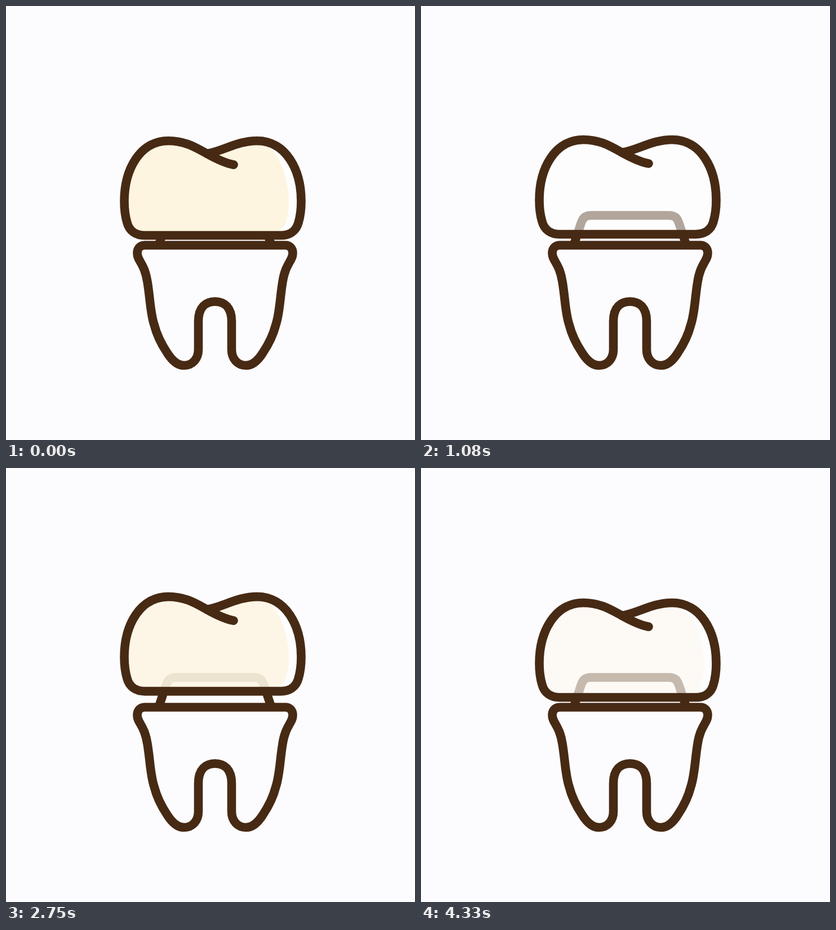
An HTML page that plays this animation: 726 by 771 pixels, repeating every 4410 ms.

```html
<!DOCTYPE html>
<html lang="en">
<head>
<meta charset="utf-8">
<title>Dental crown</title>
<style>
  html, body { margin: 0; width: 100%; height: 100%; overflow: hidden; background: #fcfcfe; }
  svg { display: block; width: 100%; height: 100%; }
  .line { fill: none; stroke: #472a14; stroke-width: 15.6; stroke-linecap: round; stroke-linejoin: round; }
</style>
</head>
<body>
<svg viewBox="0 0 726 771">
  <defs>
    <path id="shell" d="M356 262 C336 251 318 239.5 288 239.5 C238 239.5 210 290 210 347
      C210 365 212 375 215 385 C219 400 231 407.5 246 407.5 H488
      C503 407.5 515 400 519 385 C522 375 524 365 524 347
      C524 290 496 239.5 446 239.5 C410 239.5 385 258 358 262"/>
  </defs>

  <path class="line" style="stroke-linecap: butt" d="M272 422 L283 389 C287 376 291 372 302 372
    H440 C451 372 455 376 459 389 L470 422"/>
  <path class="line" d="M246 425 C238 425 233 431 233 439 C233 453 246 457 251 490
    C256 520 256 545 263 566 C268 586 276 601 286 616 C296 632 306 638.5 316 638.5
    C331 638.5 341.5 627 341.5 610 V560 C341.5 535 355 525 371 525
    C387 525 400.5 535 400.5 560 V610 C400.5 627 411 638.5 426 638.5
    C436 638.5 446 632 456 616 C466 601 474 586 479 566 C486 545 486 520 491 490
    C496 457 509 453 509 439 C509 431 504 425 496 425 Z"/>

  <g id="crown">
    <use href="#shell" fill="#fff" fill-opacity=".58"/>
    <g id="enamel">
      <use href="#shell" fill="#fff"/>
      <path fill="#fdf5e0" d="M210 347 C210 290 238 239.5 288 239.5 C318 239.5 336 251 356 262
        C385 258 410 239.5 446 239.5 C478 243 502 300 502 347
        C502 375 498 400 470 407 H246 C231 407.5 219 400 215 385 C212 375 210 365 210 347 Z"/>
    </g>
    <use href="#shell" class="line"/>
    <path class="line" d="M356 262 C372 271 388 279 404 282"/>
  </g>
</svg>
<script>
const LOOP = 4410, STEP = 1000 / 12, LIFT = 66;
const crown = document.getElementById('crown');
const enamel = document.getElementById('enamel');

const clamp = v => Math.min(1, Math.max(0, v));
const span = (t, from, to) => clamp((t - from) / (to - from));

// cubic-bezier(x1, 0, x2, 1)
function ease(x, x1, x2) {
  let lo = 0, hi = 1, u = 0.5;
  for (let i = 0; i < 24; i++) {
    u = (lo + hi) / 2;
    const v = 1 - u;
    if (3 * u * v * v * x1 + 3 * u * u * v * x2 + u * u * u < x) lo = u; else hi = u;
  }
  return u * u * (3 - 2 * u);
}

function draw(time) {
  // Motion runs at 12 steps per second; the second lift is cut off by the loop.
  const step = Math.floor((time % LOOP + 7) / STEP) % 53;
  const t = (step < 33 ? step - 0.87 : step - 33) * STEP;

  const up = ease(span(t, -72, 208), 0.33, 0.67);
  const down = ease(span(t, 210, 1110), 0.17, 0.67);
  crown.setAttribute('transform', `translate(0 ${-LIFT * (up - down)})`);

  const shown = 1 - span(t, -72, 258) + span(t, 18 * STEP, 22 * STEP);
  enamel.setAttribute('opacity', clamp(shown));
}

const start = performance.now();
function tick() {
  draw(performance.now() - start);
  requestAnimationFrame(tick);
}
tick();
</script>
</body>
</html>
```
